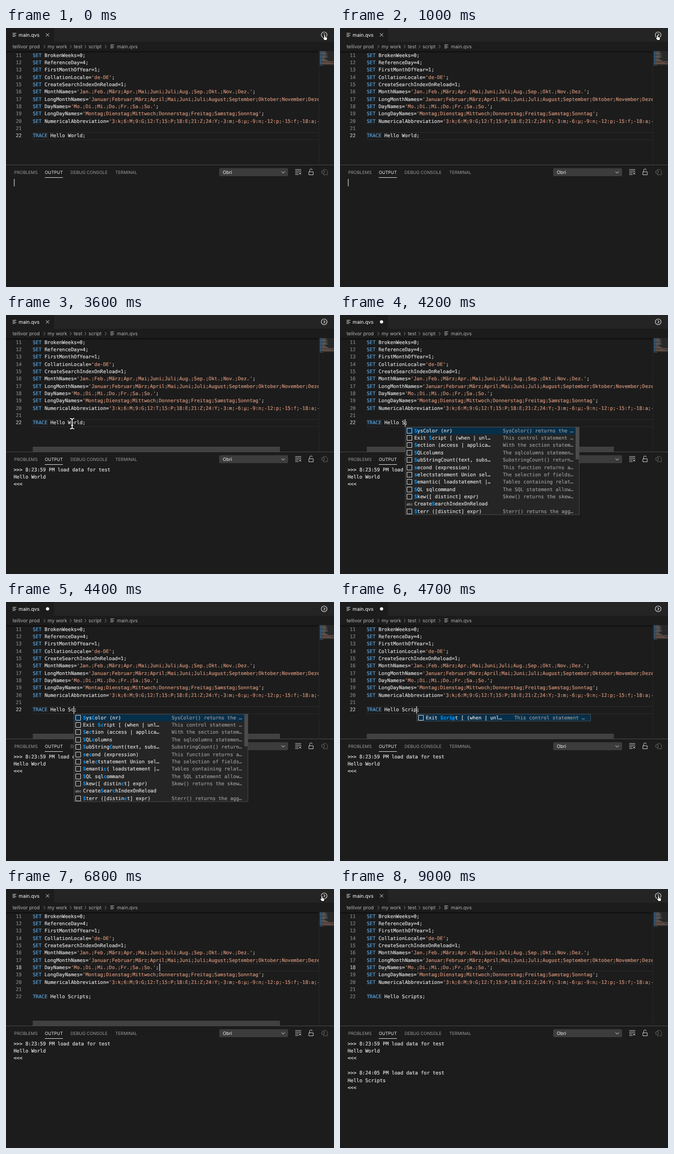
An HTML page with a canvas that plays this animation: 600 by 472 pixels, repeating every 9300 ms.

```html
<!DOCTYPE html>
<html lang="en">
<head>
<meta charset="utf-8">
<style>
html, body { margin: 0; width: 100%; height: 100%; overflow: hidden; background: #1c1c1c; }
canvas { display: block; }
</style>
</head>
<body>
<canvas id="stage" width="600" height="472"></canvas>
<script>
const ctx = document.getElementById('stage').getContext('2d');
ctx.textRendering = 'geometricPrecision';
const LOOP = 9300, CHAR = 5.36, ROW = 13.36, CODE_X = 49;
const BACK = '#1c1c1c', WHITE = '#e2e2e2', BLUE = '#5ba6e0', ORANGE = '#d6967c';

const code = [
  'SET BrokenWeeks=0;',
  'SET ReferenceDay=4;',
  'SET FirstMonthOfYear=1;',
  "SET CollationLocale='de-DE';",
  'SET CreateSearchIndexOnReload=1;',
  "SET MonthNames='Jan.;Feb.;März;Apr.;Mai;Juni;Juli;Aug.;Sep.;Okt.;Nov.;Dez.';",
  "SET LongMonthNames='Januar;Februar;März;April;Mai;Juni;Juli;August;September;Oktober;November;Dezember';",
  "SET DayNames='Mo.;Di.;Mi.;Do.;Fr.;Sa.;So.';",
  "SET LongDayNames='Montag;Dienstag;Mittwoch;Donnerstag;Freitag;Samstag;Sonntag';",
  "SET NumericalAbbreviation='3:k;6:M;9:G;12:T;15:P;18:E;21:Z;24:Y;-3:m;-6:µ;-9:n;-12:p;-15:f;-18:a;-21:z';",
  ''
];
const suggestions = [
  ['SysColor (nr)', 'SysColor() returns the …'],
  ['Exit Script [ (when | unl…', 'This control statement …'],
  ['Section (access | applica…', 'With the section statem…'],
  ['SQLcolumns', 'The sqlcolumns statemen…'],
  ['SubStringCount(text, subs…', 'SubstringCount() return…'],
  ['second (expression)', 'This function returns a…'],
  ['selectstatement Union sel…', 'The selection of fields…'],
  ['Semantic( loadstatement |…', 'Tables containing relat…'],
  ['SQL sqlcommand', 'The SQL statement allow…'],
  ['Skew([ distinct] expr)', 'Skew() returns the skew…'],
  ['CreateSearchIndexOnReload', ''],
  ['Sterr ([distinct] expr)', 'Sterr() returns the agg…']
];
// [time, text] of each output line; row is the index
const output = [
  [2100, '>>> 8:23:59 PM load data for test'], [2500, 'Hello World'], [2500, '<<<'], [2500, ''],
  [8000, '>>> 8:24:05 PM load data for test'], [8500, 'Hello Scripts'], [8500, '<<<']
];
const keyTimes = [4200, 4400, 4500, 4600, 4700, 4800, 5000];
// [time, x, y] of the mouse
const mousePath = [
  [0, 582, 13], [1000, 580, 13], [2500, 580, 13], [3300, 121, 198], [5600, 121, 198],
  [5900, 281, 144], [6300, 281, 144], [6800, 577, 13], [7200, 582, 13], [LOOP, 582, 13]
];

function rect(x, y, w, h, color) {
  ctx.fillStyle = color;
  ctx.fillRect(x, y, w, h);
}
function path(d, color, width = 1, x = 0, y = 0) {
  ctx.save();
  ctx.translate(x, y);
  ctx.strokeStyle = color;
  ctx.lineWidth = width;
  ctx.stroke(new Path2D(d));
  ctx.restore();
}
function dot(x, y, r, color) {
  ctx.fillStyle = color;
  ctx.beginPath();
  ctx.arc(x, y, r, 0, 7);
  ctx.fill();
}
function label(text, x, y, color, size = 9) {
  ctx.font = `${size}px Inter, sans-serif`;
  ctx.fillStyle = color;
  ctx.fillText(text, x, y);
}
function mono(text, x, y, color, bold = '') {
  ctx.font = `${bold} 8.9px "DejaVu Sans Mono", monospace`;
  ctx.fillStyle = ctx.strokeStyle = color;
  ctx.lineWidth = 0.2;
  [...text].forEach((c, i) => {
    ctx.fillText(c, x + i * CHAR, y);
    ctx.strokeText(c, x + i * CHAR, y);
  });
}
const baseline = n => 52.5 + (n - 11) * ROW;

function codeLine(text, y) {
  let x = CODE_X;
  for (const part of text.match(/^(SET|TRACE)|'[^']*'|[^']+/g) || []) {
    mono(part, x, y, /^(SET|TRACE)$/.test(part) ? BLUE : part[0] === "'" ? ORANGE : WHITE);
    x += part.length * CHAR;
  }
}

// Positions of the typed letters in an entry, or null if they do not all occur in order
function match(text, typed) {
  const hits = [];
  let at = -1;
  for (const c of typed.toLowerCase()) {
    at = text.toLowerCase().indexOf(c, at + 1);
    if (at < 0) return null;
    hits.push(at);
  }
  return hits;
}

function header(dirty) {
  rect(0, 0, 600, 25, '#242425');
  rect(0, 0, 88, 25, BACK);
  const fileIcon = 'M0 .5H7M0 2.5H5M0 4.5H7M0 6.5H5';
  path(fileIcon, '#b5b5b5', 1, 12, 9);
  label('main.qvs', 23, 16, '#fff');
  if (dirty) dot(76, 12.5, 3, '#eee');
  else path('M-3 -3L3 3M3 -3L-3 3', '#ddd', 1, 76, 12.5);
  path('M5.2 0A5.2 5.2 0 1 1 -5.2 0A5.2 5.2 0 1 1 5.2 0M-1 -2.6L1.6 0L-1 2.6', '#ddd', 1.1, 582, 12.5);

  const crumbs = [['tellivor prod', 12], ['my work', 76], ['test', 124], ['script', 151], ['main.qvs', 203]];
  for (const [text, x] of crumbs) label(text, x, 37, '#b2b2b2', 8.9);
  for (const x of [69, 117, 144, 181]) path('M0 0L2.5 3L0 6', '#888', 0.9, x, 31);
  path(fileIcon, '#a0a0a0', 1, 191, 30);
}

function minimap() {
  rect(574, 42, 26, 26, 'rgba(121,121,121,.13)');
  rect(572, 42, 1, 206, '#262626');
  for (let i = 0; i < 22; i++) {
    const known = i > 9 ? code[i - 10] || 'TRACE Hello' : 'x'.repeat(20 + i * 7 % 13);
    const y = 42.5 + i * 1.2, length = i === 20 ? 0 : known.length * 0.45;
    rect(575, y, Math.min(length, 3), 0.8, '#3a6288');
    rect(578, y, Math.max(0, Math.min(length - 3, 22)), 0.8, known.includes("'") ? '#765a4e' : '#666');
  }
  rect(574, 42, 1, 26, '#2f5f80');
}

function editor(t, word) {
  const line = t >= 6000 ? 18 : 22;
  const top = Math.round(baseline(line) - 9.6);
  ctx.save();
  ctx.beginPath();
  ctx.rect(0, 42, 572, 207);
  ctx.clip();
  ctx.strokeStyle = '#2a2a2c';
  ctx.lineWidth = 1;
  ctx.strokeRect(CODE_X + 0.5, top + 0.5, 530, 13);
  if (t >= 3700 && t < 4200) rect(CODE_X + 12 * CHAR, top, 5 * CHAR, 13.4, '#264f78');
  [...code, `TRACE Hello ${word};`].forEach((text, i) => {
    const n = i + 11;
    mono(String(n), 18, baseline(n), n === line ? '#c6c6c6' : '#858585');
    codeLine(text, baseline(n));
  });
  const shadow = ctx.createLinearGradient(0, 42, 0, 46);
  shadow.addColorStop(0, 'rgba(0,0,0,.5)');
  shadow.addColorStop(1, 'rgba(0,0,0,0)');
  rect(0, 42, 572, 4, shadow);

  // Steady while typing and after the click, then blinking
  const caretOn = t < 7000 ? t >= 4200 && t < 5500 || t >= 6000 : Math.floor(t / 500) % 2 === 1;
  const column = line === 18 ? 43.2 : 12 + word.length;
  if (caretOn) rect(Math.round(CODE_X + column * CHAR) - 0.5, top, 1.2, 13.4, '#e0e0e0');
  const barAlpha = t < 2800 ? 0 : Math.max(0, Math.min(1, (7700 - t) / 400));
  rect(CODE_X, 240, 452, 9, `rgba(121,121,121,${0.4 * barAlpha})`);
  ctx.restore();
  minimap();
}

function panel(t) {
  rect(0, 249, 600, 1, '#464646');
  const tabs = [['PROBLEMS', 15], ['OUTPUT', 71], ['DEBUG CONSOLE', 118], ['TERMINAL', 200]];
  for (const [text, x] of tabs) label(text, x, 265.8, x === 71 ? '#f0f0f0' : '#9c9c9c', 7.9);
  rect(71, 272, 33, 1, '#d0d0d0');

  ctx.fillStyle = '#3c3c3c';
  ctx.beginPath();
  ctx.roundRect(390, 255.5, 126, 14.5, 2);
  ctx.fill();
  label('Obri', 396.5, 266, '#f0f0f0', 8.5);
  path('M-3 -1.5L0 1.5L3 -1.5', '#ddd', 1, 507, 263);
  path('M0 .5H11M0 3.5H11M0 6.5H6M0 9.5H6M7 5.5L11 9.5M11 5.5L7 9.5', '#c5c5c5', 1, 529, 257.5);
  path('M.5 5H8.5V10.5H.5ZM2 5V2.5A2.4 2.4 0 0 1 6.8 2', '#c5c5c5', 1, 553.5, 257);
  path('M3 4V1H8L10.5 3.5V10.5H3V8M0 3.5H5V7.5H0Z', '#5a5a5a', 1, 577.5, 257);

  const shown = output.filter(([start]) => t >= start);
  shown.forEach(([, text], i) => mono(text, 14, 284.5 + i * 13.4, WHITE));
  if (t < 3600) rect(14.5, 275 + shown.length * 13.4, 1.2, 13.4, '#ccc');
}

function popup(typed) {
  const query = typed.slice(0, 6);
  const rows = suggestions.filter(([name]) => match(name, query));
  const x = Math.round(CODE_X + (12 + typed.length) * CHAR), y = 204, h = rows.length * ROW;
  rect(x, y, 319, h, '#252526');
  rect(x, y, 319, ROW, '#062f4a');
  rows.forEach(([name, detail], i) => {
    const base = y + i * ROW + 9.7;
    if (detail) path('M.5 .5H9.5V9.5H.5Z', '#ccc', 1, x + 3, Math.round(base - 8));
    else label('abc', x + 2.5, base - 0.5, '#ccc', 6.5);
    const hits = match(name, query);
    [...name].forEach((c, k) => {
      const hit = hits.includes(k);
      mono(c, x + 17 + k * CHAR, base, hit ? '#0097fb' : WHITE, hit ? 'bold' : '');
    });
    mono(detail, x + 179, base, '#9a9a9a');
  });
  if (rows.length === suggestions.length) rect(x + 312, y, 7, 59, '#4b4b4c');
  ctx.strokeStyle = '#454545';
  ctx.lineWidth = 1;
  ctx.strokeRect(x + 0.5, y + 0.5, 318, h - 1);
}

function mouse(t) {
  if (t >= 4200 && t < 5400) return;
  const i = mousePath.findIndex(([end]) => end > t);
  const [t0, x0, y0] = mousePath[i - 1], [t1, x1, y1] = mousePath[i];
  const p = (t - t0) / (t1 - t0), ease = p * p * (3 - 2 * p);
  const x = x0 + (x1 - x0) * ease, y = y0 + (y1 - y0) * ease;
  if (y > 42 && x < 572) {
    const beam = 'M-4 -9.5Q0 -9.5 0 -6.5Q0 -9.5 4 -9.5M0 -6.5V6.5M-4 9.5Q0 9.5 0 6.5Q0 9.5 4 9.5M-2 3H2';
    path(beam, '#000', 3.4, x, y);
    path(beam, '#fff', 1.6, x, y);
  } else {
    const hand = 'M0 0Q1.3 -.8 1.7 .8V3.5L4.6 4.2Q5.6 4.5 5.3 6L4.5 9H.6L-2 5.6Q-2 4.3 -.5 5L0 5.4Z';
    path(hand, '#000', 1.4, x, y);
    ctx.save();
    ctx.translate(x, y);
    ctx.fillStyle = '#fff';
    ctx.fill(new Path2D(hand));
    ctx.restore();
  }
}

function draw(now) {
  const t = Math.floor(now % LOOP / 100) * 100;
  const typed = 'Scripts'.slice(0, keyTimes.filter(k => t >= k).length);
  rect(0, 0, 600, 472, BACK);
  header(t >= 4200 && t < 6300);
  editor(t, typed || 'World');
  panel(t);
  if (typed && t < 6000) popup(typed);
  mouse(t);
}

const start = performance.now();
function tick() {
  draw(performance.now() - start);
  requestAnimationFrame(tick);
}
tick();
</script>
</body>
</html>
```
